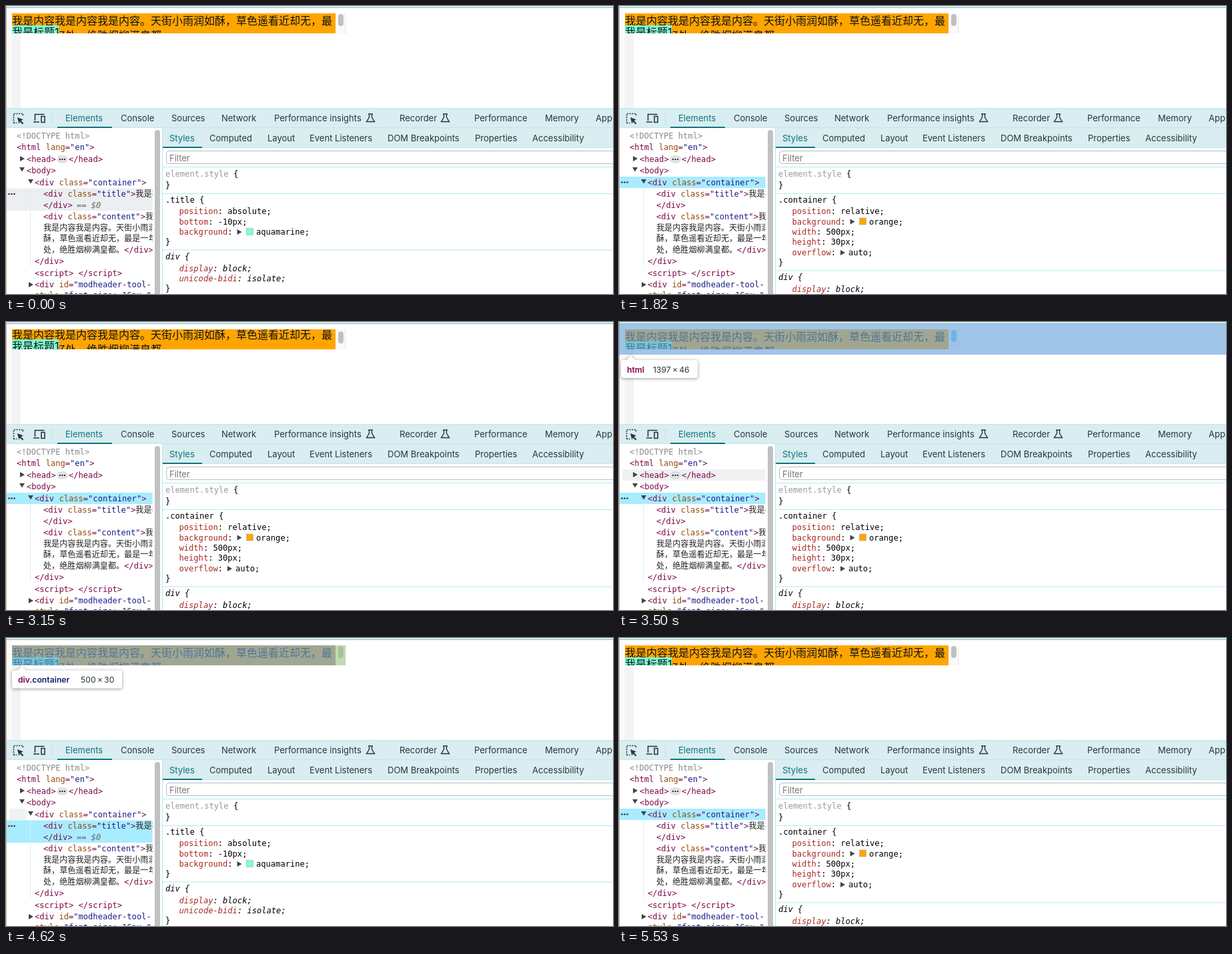
Animation of 910x432 px, one loop 6.51 s. Source, as an HTML page:

```html
<!DOCTYPE html>
<html lang="en">
<head>
<meta charset="utf-8">
<style>
html, body { margin: 0; width: 100%; height: 100%; overflow: hidden; background: #fff; }
svg { display: block; }
text { white-space: pre; }
.mono { font: 12.1px "DejaVu Sans Mono", "Noto Sans CJK SC", monospace; }
.ui { font: 13px Inter, "Noto Sans", sans-serif; fill: #26373a; }
.page { font: 16px Inter, "Noto Sans CJK SC", sans-serif; fill: #111; }
.ua { font-style: italic; }
.tip { filter: drop-shadow(0 1px 2.5px rgba(0,0,0,.4)); }
</style>
</head>
<body>
<svg id="stage" width="910" height="432" viewBox="0 0 910 432"></svg>
<script>
const LOOP = 6510;
const TEAL = '#0b7580', LINE = '#b4eaf3', BAR = '#daedf0';
const CONTENT = 'rgba(111,168,220,.66)', MARGIN = 'rgba(246,178,107,.66)', GUTTER = 'rgba(147,196,125,.55)';

const esc = s => s.replace(/&/g, '&amp;').replace(/</g, '&lt;');
const rect = (x, y, w, h, fill, more = '') =>
  `<rect x="${x}" y="${y}" width="${w}" height="${h}" fill="${fill}" ${more}/>`;
const path = (d, fill, more = '') => `<path d="${d}" fill="${fill}" ${more}/>`;
const stroke = (d, color, w = 1.4) => path(d, 'none', `stroke="${color}" stroke-width="${w}"`);
const text = (cls, x, y, s, more = '') => `<text class="${cls}" x="${x}" y="${y}" ${more}>${esc(s)}</text>`;
const group = (id, body, more = '') => `<g id="${id}" ${more}>${body}</g>`;
const right = (x, y) => path(`M${x} ${y - 4}l7 4l-7 4z`, '#444');
const down = (x, y) => path(`M${x} ${y - 3}h8l-4 6.5z`, '#444');

// Colours one line of markup by token.
function markup(x, y, s) {
  const tokens = s.match(/<\/?\w+|>|[\w-]+(?==)|"[^"]*"?|[^<>"]/g);
  const color = t => /^[<>=]/.test(t) ? '#7d0846' : t[0] === '"' ? '#1b1b8a' : /^[\w-]{2,}$/.test(t) ? '#94480a' : '#222';
  return `<text class="mono" x="${x}" y="${y}">` +
    tokens.map(t => `<tspan fill="${color(t)}">${esc(t)}</tspan>`).join('') + '</text>';
}

function pageView() {
  return rect(0, 0, 910, 153, '#fff') +
    rect(9, 41, 13, 112, '#f4f4f4') + rect(1, 3, 8, 150, '#fafafa') +
    rect(0, 0, 910, 2, BAR) + rect(0, 2, 910, 1, '#86bcc5') +
    rect(9, 11, 485, 30, '#ffa500') + rect(494, 11, 15, 30, '#fafafa') +
    rect(508, 11, 1, 30, '#e6e6e6') +
    '<g clip-path="url(#box)">' + group('scrolled',
      text('page', 9, 28, '我是内容我是内容我是内容。天街小雨润如酥，草色遥看近却无，最') +
      text('page', 9, 50, '是一年春好处，绝胜烟柳满皇都。') +
      rect(9, 29, 70, 22, '#7fffd4') + text('page', 9, 45, '我是标题1')) + '</g>' +
    rect(498, 12, 8, 18, '#c1c1c1', 'id="thumb" rx="4"');
}

function flask(x) {
  return stroke(`M${x + 3} 162h7M${x + 4.5} 162v5l-4 6.5h12l-4 -6.5v-5`, '#26373a', 1.4);
}

function toolbar() {
  const tabs = [[172, 'Console'], [248, 'Sources'], [323, 'Network'], [402, 'Performance insights'],
    [590, 'Recorder'], [702, 'Performance'], [808, 'Memory'], [884, 'Application']];
  const panes = [[305, 'Computed'], [392, 'Layout'], [455, 'Event Listeners'],
    [572, 'DOM Breakpoints'], [703, 'Properties'], [789, 'Accessibility']];
  const row = (list, y) => list.map(([x, s]) => text('ui', x, y, s)).join('');
  return rect(0, 153, 910, 30, BAR) + rect(0, 153, 910, 1, LINE) + rect(0, 182, 910, 1, LINE) +
    path('M11.5 175.5v-14h14v4M11.5 175.5h5', 'none', 'stroke="#26373a" stroke-width="1.6" stroke-dasharray="2 1.6"') +
    path('M17 167l9 3.5l-3.6 1.5l4 4l-1.6 1.5l-4 -4l-1.4 3.2z', '#26373a') +
    stroke('M43.5 172v-9.5h14M41 174h9M53 165.5h5v9h-5z', '#26373a', 1.6) +
    rect(69, 159, 1, 18, LINE) +
    text('ui', 89, 172.5, 'Elements', `style="fill:${TEAL}"`) + rect(77, 181, 82, 2, TEAL) +
    row(tabs, 172.5) + flask(540) + flask(652) +
    rect(235, 183, 675, 30, BAR) + rect(235, 212, 675, 1, LINE) +
    text('ui', 245, 202.5, 'Styles', `style="fill:${TEAL}"`) + rect(235, 211, 59, 2, TEAL) +
    row(panes, 202.5) +
    rect(240.5, 217.5, 690, 19, '#fff', 'stroke="#b3bfc2" rx="4"') +
    text('ui', 245, 232.5, 'Filter', 'style="fill:#757575"');
}

function tree() {
  const lines = [[16, 216, '<html lang="en">'], [31, 233.5, '<head>'], [94, 233.5, '</head>'],
    [31, 251, '<body>'], [43, 268.5, '<div class="container">'],
    [56, 286, '<div class="title">我是标题1'], [56, 303, '</div>'],
    [56, 320, '<div class="content">我是内容'], [56, 336.5, '我是内容我是内容。天街小雨润如'],
    [56, 353, '酥，草色遥看近却无，最是一年春好'], [56, 370, '处，绝胜烟柳满皇都。</div>'],
    [43, 387, '</div>'], [43, 405, '<script> <\/script>'],
    [43, 422, '<div id="modheader-tool-'], [43, 438, 'style="font-size: 16px;"']];
  return rect(0, 183, 234, 249, '#fff') + '<g clip-path="url(#tree)">' +
    rect(5, 0, 220, 17, '#f0f1f2', 'id="hover"') + rect(0, 0, 220, 17, '#a8ecff', 'id="selected"') +
    rect(36, 273, 1, 117, '#d5f0f5') +
    text('mono', 16, 199, '<!DOCTYPE html>', 'fill="#8a8a8a"') +
    lines.map(l => markup(...l)).join('') +
    rect(77, 225, 15, 10, '#e3e5e6', 'rx="5" stroke="#b9bec0" stroke-width=".6"') +
    [81, 84.5, 88].map(x => `<circle cx="${x}" cy="230" r="1.2" fill="#333"/>`).join('') +
    right(21, 229) + down(20, 245) + down(33, 263) + right(34, 418) +
    text('mono ua', 106, 303, '== $0', 'id="ref" fill="#666"') +
    group('dots', [4.5, 8.5, 12.5].map(x => `<circle cx="${x}" cy="0" r="1.3" fill="#333"/>`).join('')) +
    '</g>' + rect(223, 186, 8, 260, '#c1c1c1', 'rx="4"') + rect(234, 183, 1, 249, LINE) +
    rect(0, 0, 1, 432, '#cbb09a');
}

const prop = (y, name, value, cls = '') =>
  `<text class="mono ${cls}" x="259.5" y="${y}"><tspan fill="#a92a22">${name}</tspan>: ${value}</text>`;

// A shorthand property: disclosure arrow, optional swatch, then the value.
const shorthand = (y, name, value, color) => {
  const x = 332 + (name.length - 8) * 7.28;
  return prop(y, name, '') + right(x, y - 4) +
    (color ? rect(360.5, y - 9.5, 10, 10, color, 'stroke="#aaa" stroke-width=".6"') : '') +
    text('mono', color ? 375 : x + 12, y, value);
};

function userAgent(y) {
  return rect(235, y - 14.5, 675, 1, LINE) + text('mono ua', 239, y, 'div {') +
    prop(y + 18, 'display', 'block;', 'ua') + prop(y + 33, 'unicode-bidi', 'isolate;', 'ua') +
    text('mono', 239, y + 48, '}');
}

function styles() {
  const checks = [309, 324.5, 340].map(y => rect(240, y - 7, 14, 14, TEAL, 'rx="2.5"') +
    stroke(`M243 ${y}l3 3.2l5.2 -6.4`, '#fff', 2)).join('');
  return rect(235, 241, 675, 1, LINE) + rect(235, 281, 675, 1, LINE) +
    '<text class="mono" x="239" y="255.5"><tspan fill="#999">element.style</tspan> {</text>' +
    text('mono', 239, 272.5, '}') +
    group('titleRule', text('mono', 239, 294.5, '.title {') +
      prop(312, 'position', 'absolute;') + prop(327.5, 'bottom', '-10px;') +
      shorthand(343, 'background', 'aquamarine;', '#7fffd4') +
      text('mono', 239, 358, '}') + userAgent(380)) +
    group('boxRule', text('mono', 239, 294.5, '.container {') +
      prop(312, 'position', 'relative;') + shorthand(327.5, 'background', 'orange;', '#ffa500') +
      prop(343, 'width', '500px;') + prop(358, 'height', '30px;') +
      shorthand(374, 'overflow', 'auto;') +
      text('mono', 239, 388.5, '}') + userAgent(411)) +
    group('checks', checks);
}

// Node highlight with its size label.
function highlight(id, shapes, x, bottom, tag, cls, size, sizeX, w) {
  const y = bottom + 8;
  return group('over-' + id, shapes + '<g class="tip">' +
    rect(x, y, w, 27, '#fff', 'rx="4"') + path(`M${x + 8} ${y + .5}l7 -6.5l7 6.5z`, '#fff') + '</g>' +
    `<text class="ui" x="${x + 9}" y="${y + 18.5}" style="font-size:12.2px;font-weight:600"><tspan fill="#7d0846">${tag}</tspan><tspan fill="#1a1f6e">${cls}</tspan></text>` +
    text('ui', sizeX, y + 18.5, size.replace('x', '\u2009×\u2009'), 'style="font-size:12.2px"'));
}

function highlights() {
  const body = path('M0 3h910v46h-910zM9 11v30h910v-30z', MARGIN, 'fill-rule="evenodd"') + rect(9, 11, 901, 30, CONTENT);
  const box = rect(9, 11, 485, 30, CONTENT) + rect(494, 11, 15, 30, GUTTER);
  return highlight('html', rect(0, 3, 910, 46, CONTENT), 3, 49, 'html', '', '1397x46', 51, 115) +
    highlight('body', body, 3, 49, 'body', '', '1381x30', 54, 117) +
    highlight('box', box, 9, 40.5, 'div', '.container', '500x30', 112, 165) +
    highlight('title', rect(9, 29, 70, 22, CONTENT), 9, 51, 'div', '.title', '70x22', 79, 124) +
    highlight('content', rect(9, 11, 485, 44, CONTENT), 9, 55, 'div', '.content', '485x44', 102, 155);
}

const stage = document.getElementById('stage');
stage.innerHTML =
  '<clipPath id="box"><rect x="9" y="11" width="485" height="30"/></clipPath>' +
  '<clipPath id="tree"><rect x="0" y="183" width="219.5" height="249"/></clipPath>' +
  rect(0, 0, 910, 432, '#fff') + pageView() + styles() + toolbar() + tree() + highlights() +
  group('spec', '<g class="tip">' + rect(228, 248, 128, 27, '#fff', 'rx="4"') +
    path('M255 274.5l7 7l7 -7z', '#fff') + '</g>' +
    text('ui', 236, 266, 'Specificity: (0,1,0)', 'style="font-size:12.6px"'));

// Each step changes only the listed parts of the state.
const steps = [
  [0, { sel: 'title', blur: true, over: '', row: 0, scroll: 0, checks: false, spec: false }],
  [700, { over: 'content', row: 307 }],
  [910, { over: 'title', row: 0 }],
  [1190, { over: 'box', row: 256 }],
  [1400, { sel: 'box', blur: false, row: 0 }],
  [1610, { over: '' }],
  [2450, { scroll: 3 }], [2520, { scroll: 7 }], [2590, { scroll: 11 }], [2660, { scroll: 12 }], [2730, { scroll: 13 }],
  [3010, { scroll: 11 }], [3080, { scroll: 7 }], [3150, { scroll: 3 }], [3220, { scroll: 1 }], [3290, { scroll: 0 }],
  [3430, { over: 'html', row: 203 }],
  [3500, { row: 221 }],
  [3570, { over: 'body', row: 238 }],
  [3640, { over: 'box', row: 0 }],
  [3710, { over: 'title', row: 273 }],
  [3920, { sel: 'title', row: 0 }],
  [4200, { over: '', checks: true }],
  [4410, { checks: false }],
  [4550, { over: 'title' }],
  [4620, { over: 'box', row: 256 }],
  [4900, { sel: 'box', row: 0 }],
  [5180, { over: 'body', row: 238, spec: true }],
  [5250, { over: 'html', row: 203 }],
  [5320, { over: '', row: 0, spec: false }]
];

const el = id => document.getElementById(id);
const show = (id, on) => { el(id).style.display = on ? '' : 'none'; };
const put = (id, attrs) => { for (const k in attrs) el(id).setAttribute(k, attrs[k]); };

function draw(t) {
  const s = Object.assign({}, ...steps.filter(([at]) => at <= t).map(step => step[1]));
  const title = s.sel === 'title';
  put('scrolled', { transform: `translate(0 ${-s.scroll})` });
  put('thumb', { y: 12 + s.scroll * .77, fill: /html|body/.test(s.over) ? '#6cccee' : '#c1c1c1' });
  put('selected', { y: title ? 273.5 : 256, height: title ? 33.5 : 17, fill: s.blur ? '#ebeff1' : '#a8ecff' });
  put('dots', { transform: `translate(0 ${title ? 282 : 264.5})` });
  put('hover', { y: s.row, width: s.row === 256 ? 26 : 220, height: s.row === 307 ? 67 : 17 });
  show('hover', s.row);
  show('ref', title);
  show('titleRule', title);
  show('boxRule', !title);
  show('checks', s.checks);
  show('spec', s.spec);
  for (const id of ['html', 'body', 'box', 'title', 'content']) show('over-' + id, s.over === id);
}

const start = performance.now();
function tick() {
  draw((performance.now() - start) % LOOP);
  requestAnimationFrame(tick);
}
tick();
</script>
</body>
</html>
```
